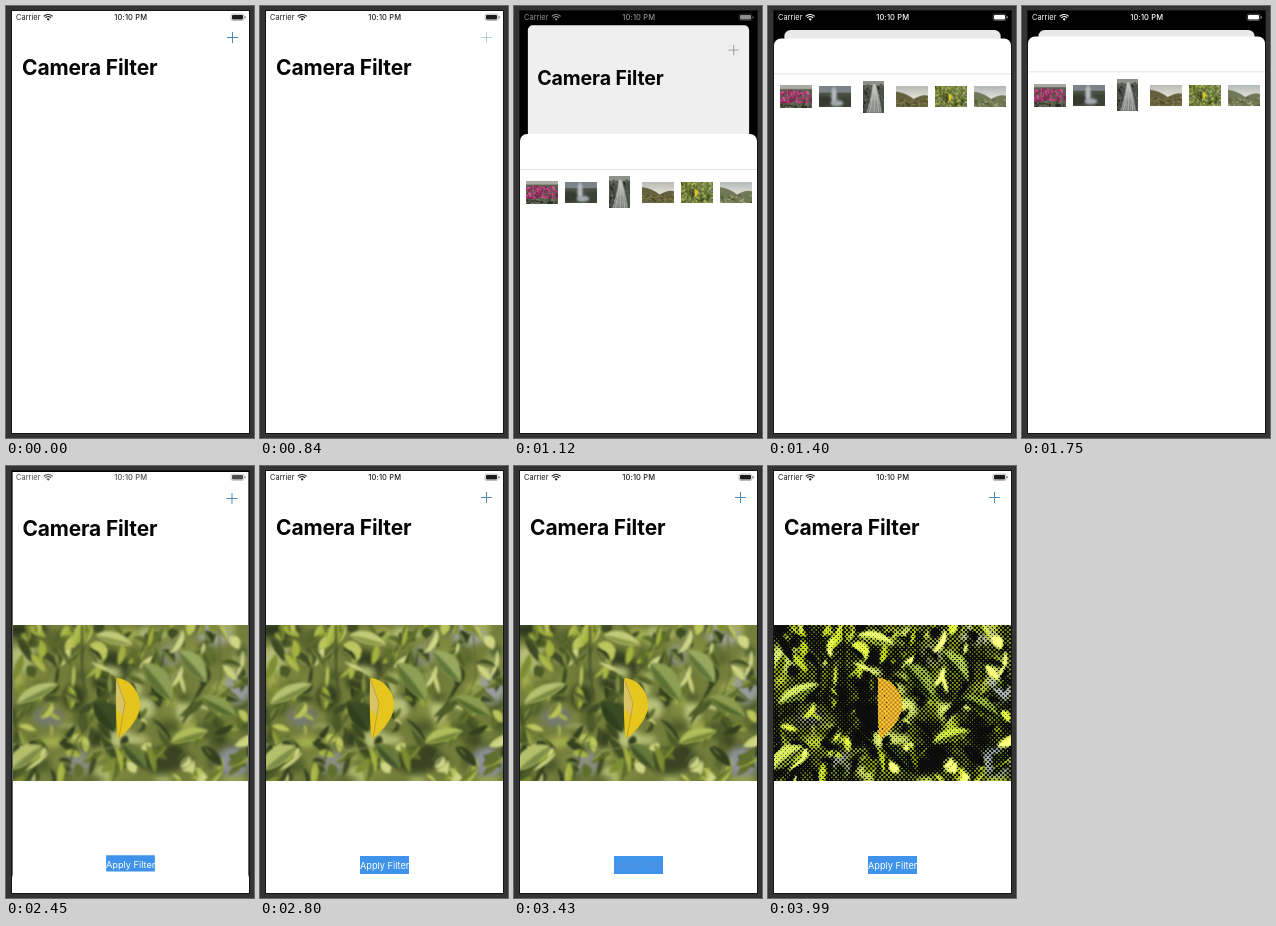
Animation of 248x432 px, one loop 4060 ms. Source, as an HTML page with a canvas:

```html
<!DOCTYPE html>
<html lang="en">
<head>
<meta charset="utf-8">
<title>Camera Filter</title>
<style>
html, body { margin: 0; width: 100%; height: 100%; overflow: hidden; background: #343434; }
canvas { display: block; width: 248px; height: 432px; }
</style>
</head>
<body>
<canvas id="stage"></canvas>
<script>
const LOOP = 4060, STEP = 70;
const W = 248, H = 432;
const SCREEN = { x: 6, y: 5, w: 237, h: 422 };
const PHOTO = { x: 6, y: 159, w: 237, h: 156 };
const SHEET = { open: 30.5, closed: 428, rise: 960, fall: 2180, rate: 17 };
const FONT = 'Inter, "Liberation Sans", sans-serif';

const stage = document.getElementById('stage');
const dpr = window.devicePixelRatio || 1;
stage.width = W * dpr;
stage.height = H * dpr;
const ctx = stage.getContext('2d');

const clamp = v => Math.max(0, Math.min(1, v));
const ramp = (t, from, to) => clamp((t - from) / (to - from));
const mix = (a, b, k) => `rgb(${a.map((v, i) => Math.round(v + (b[i] - v) * k))})`;

// Critically damped spring, 0 to 1
function spring(ms) {
  const x = SHEET.rate * Math.max(0, ms) / 1000;
  return 1 - (1 + x) * Math.exp(-x);
}

function seeded(seed) {
  return () => {
    seed = (seed * 1664525 + 1013904223) >>> 0;
    return seed / 4294967296;
  };
}

function makeCanvas(w, h, paint) {
  const c = document.createElement('canvas');
  c.width = w;
  c.height = h;
  paint(c.getContext('2d'), w, h);
  return c;
}

function box(g, color, x, y, w, h, r = 0) {
  g.fillStyle = color;
  g.beginPath();
  g.roundRect(x, y, w, h, r);
  g.fill();
}

function line(g, color, width, points) {
  g.strokeStyle = color;
  g.lineWidth = width;
  g.beginPath();
  points.forEach(([x, y], i) => i ? g.lineTo(x, y) : g.moveTo(x, y));
  g.stroke();
}

function blob(g, color, x, y, rx, ry) {
  g.fillStyle = color;
  g.beginPath();
  g.ellipse(x, y, rx, ry, 0, 0, Math.PI * 2);
  g.fill();
}

// A leaf with one bowed and one flatter side
function leaf(g, color, x, y, length, width, angle, shade) {
  const half = length / 2;
  g.save();
  g.translate(x, y);
  g.rotate(angle);
  g.fillStyle = color;
  g.beginPath();
  g.moveTo(-half, 0);
  g.bezierCurveTo(-half * 0.6, -width, half * 0.4, -width, half, 0);
  g.quadraticCurveTo(0, width * 0.7, -half, 0);
  g.fill();
  if (shade) {
    g.fillStyle = shade;
    g.beginPath();
    g.moveTo(-half, 0);
    g.quadraticCurveTo(0, -width * 0.2, half, 0);
    g.quadraticCurveTo(0, width * 0.7, -half, 0);
    g.fill();
  }
  g.restore();
}

function paintLeaves(g, w, h) {
  const rnd = seeded(41);
  const pick = list => list[Math.floor(rnd() * list.length)];
  box(g, '#747e3b', 0, 0, w, h);

  g.filter = 'blur(3px)';
  for (let i = 0; i < 150; i++) {
    blob(g, pick(['#a5b04f', '#b9c279', '#4d5b2a', '#343f1f', '#7f893f', '#59652e']),
      rnd() * w, rnd() * h, 3 + rnd() * 10, 3 + rnd() * 8);
  }
  blob(g, '#989ca2', 226, 62, 12, 17);
  blob(g, '#8f929a', 222, 137, 17, 15);
  blob(g, '#a0a396', 203, 10, 18, 10);
  blob(g, '#8a8f82', 66, 137, 14, 13);
  blob(g, '#979a8e', 158, 30, 10, 10);
  blob(g, '#767b70', 36, 92, 15, 10);
  blob(g, '#30391d', 12, 5, 24, 8);
  blob(g, '#353f20', 62, 72, 12, 13);
  blob(g, '#3a4423', 150, 136, 22, 12);
  g.filter = 'blur(0.9px)';

  for (let i = 0; i < 210; i++) {
    const x = rnd() * w, y = rnd() * h, size = 10 + rnd() * 21;
    leaf(g, pick(['#7d8d32', '#a4b23f', '#4c5b27', '#323f1e', '#bcc65c', '#5f6f2c', '#d0d686', '#3f4c24']),
      x, y, size, 3 + rnd() * 7, 0.2 + rnd() * 2.5, pick(['#c6ce7077', '#34411f88', '']));
  }

  line(g, '#46502b', 2, [[70, 0], [70, 48], [73, 70]]);
  line(g, '#4b552a', 1.6, [[140, 0], [125, 38], [91, 77], [64, 116], [53, 153]]);
  line(g, '#5e6938', 1.3, [[207, 0], [210, 50], [196, 92], [166, 136]]);
  line(g, '#8a9451', 1.2, [[0, 120], [43, 108], [82, 126], [116, 120]]);

  leaf(g, '#c2cb79', 102, 15, 38, 11, 0.25, '#8c994a');
  leaf(g, '#8d9f55', 145, 57, 48, 18, 0.9, '#5c7233');
  leaf(g, '#98a95f', 181, 42, 42, 16, 0.85, '#61763a');
  leaf(g, '#8b9c50', 207, 82, 42, 13, 0.5, '#536a2d');
  leaf(g, '#b5c071', 25, 69, 46, 12, -0.45, '#7a8b41');
  leaf(g, '#b4bf6b', 14, 133, 40, 16, -0.65, '#7d8c47');
  leaf(g, '#3a4c23', 92, 92, 36, 19, 0.95, '#2f3f1d');
  leaf(g, '#65783a', 122, 132, 36, 13, 0.8, '#42532a');
  leaf(g, '#b0bd5a', 178, 112, 40, 12, -0.3, '#758539');

  g.filter = 'blur(0.4px)';
  g.fillStyle = '#e6c51c';
  g.beginPath();
  g.moveTo(104, 53);
  g.bezierCurveTo(120, 54, 130, 70, 128, 84);
  g.bezierCurveTo(125, 97, 114, 108, 106, 114);
  g.bezierCurveTo(103, 96, 104, 72, 104, 53);
  g.fill();
  g.fillStyle = '#d9c465';
  g.beginPath();
  g.moveTo(104, 54);
  g.quadraticCurveTo(116, 72, 112, 92);
  g.lineTo(104, 84);
  g.fill();
  line(g, '#b89b24', 0.8, [[104, 53], [113, 78], [107, 113]]);
  g.filter = 'none';
}

// Contrasty colours under a diagonal screen of black dots
function paintComic(g, w, h) {
  g.drawImage(leaves, 0, 0);
  const img = g.getImageData(0, 0, w, h), d = img.data;
  for (let y = 0; y < h; y++) {
    for (let x = 0; x < w; x++) {
      const i = (y * w + x) * 4;
      const light = (0.3 * d[i] + 0.59 * d[i + 1] + 0.11 * d[i + 2]) / 255;
      const screen = Math.cos(x * Math.PI / 2.2) * Math.cos(y * Math.PI / 2.2);
      const ink = clamp((0.5 + 0.24 * screen - light) * 7 + 0.5);
      const golden = d[i] > 200 && d[i + 2] < 110 && d[i] > d[i + 1] + 12;
      for (let c = 0; c < 3; c++) {
        const vivid = light * 255 + (d[i + c] - light * 255) * 1.25;
        const bright = Math.min(255, (vivid - 128) * 1.35 + 148);
        d[i + c] = golden
          ? [222, 168, 45][c] - screen * [35, 55, 15][c]
          : Math.max(0, bright) * (1 - ink) + 12 * ink;
      }
    }
  }
  g.putImageData(img, 0, 0);
}

function landscape(sky, hill, ground, seed) {
  return (g, w, h) => {
    const rnd = seeded(seed);
    const air = g.createLinearGradient(0, 0, 0, h);
    air.addColorStop(0, sky);
    air.addColorStop(0.5, '#dcdcd2');
    g.fillStyle = air;
    g.fillRect(0, 0, w, h);
    g.fillStyle = hill;
    g.beginPath();
    g.moveTo(0, h * 0.25);
    g.quadraticCurveTo(w * 0.3, h * 0.3, w * 0.55, h * 0.6);
    g.quadraticCurveTo(w * 0.85, h * 0.35, w, h * 0.45);
    g.lineTo(w, h);
    g.lineTo(0, h);
    g.fill();
    for (let i = 0; i < 60; i++) {
      blob(g, ground[i % ground.length], rnd() * w, h * (0.6 + rnd() * 0.4), 2 + rnd() * 5, 1 + rnd() * 3);
    }
  };
}

function paintFlowers(g, w, h) {
  const rnd = seeded(9);
  box(g, '#59614b', 0, 0, w, h);
  box(g, '#a9aba5', 0, 0, w, h * 0.16);
  for (let i = 0; i < 150; i++) {
    blob(g, ['#b92d77', '#cf3f8c', '#8e2359', '#d75b9f', '#6e2447'][i % 5],
      rnd() * w, h * (0.24 + rnd() * 0.53), 2 + rnd() * 4, 2 + rnd() * 3);
  }
  for (let i = 0; i < 40; i++) {
    blob(g, ['#33382c', '#24271f', '#747a62'][i % 3], rnd() * w, h * (0.8 + rnd() * 0.2), 4, 3);
  }
}

function paintSpray(g, w, h) {
  box(g, '#7c8387', 0, 0, w, h);
  box(g, '#4c5146', 0, h * 0.3, w, h * 0.7);
  g.filter = 'blur(4px)';
  blob(g, '#343a2e', w * 0.15, h * 0.72, w * 0.3, h * 0.25);
  blob(g, '#3d4237', w * 0.85, h * 0.75, w * 0.25, h * 0.3);
  blob(g, '#b9bec3', w * 0.47, h * 0.45, w * 0.08, h * 0.42);
  blob(g, '#a4a9b2', w * 0.56, h * 0.8, w * 0.2, h * 0.14);
  g.filter = 'none';
}

function paintWaterfall(g, w, h) {
  const rnd = seeded(17);
  box(g, '#4b5048', 0, 0, w, h);
  box(g, '#8d918a', 0, 0, w, h * 0.14);
  for (let i = 0; i < 50; i++) {
    blob(g, ['#292d28', '#5f6558', '#3b4038'][i % 3], rnd() * w, h * (0.1 + rnd() * 0.9), 5, 6);
  }
  g.filter = 'blur(2px)';
  for (let i = 0; i < 7; i++) {
    line(g, i % 2 ? '#d6d9d8' : '#b5bab8', 5, [
      [w * 0.5 + i, h * 0.12], [w * (0.42 + i * 0.05), h * 0.45], [w * (0.2 + i * 0.11), h]
    ]);
  }
  g.filter = 'none';
}

const leaves = makeCanvas(PHOTO.w, PHOTO.h, paintLeaves);
const comic = makeCanvas(PHOTO.w, PHOTO.h, paintComic);
const thumbs = [
  [28, 32, 23, makeCanvas(128, 92, paintFlowers)],
  [67, 32, 21, makeCanvas(128, 84, paintSpray)],
  [105.5, 21, 32, makeCanvas(84, 128, paintWaterfall)],
  [144, 32, 21, makeCanvas(128, 84, landscape('#b9bab4', '#65613f', ['#454528', '#7c773e', '#938951'], 5))],
  [182.5, 32, 21, leaves],
  [221.5, 32, 21, makeCanvas(128, 84, landscape('#b3b9bd', '#707857', ['#788044', '#4e5937', '#b0b08a'], 23))]
];

function text(str, x, y, size, weight, color, align = 'left', spacing = 0) {
  ctx.font = `${weight} ${size}px ${FONT}`;
  ctx.textAlign = align;
  ctx.textBaseline = 'alphabetic';
  ctx.letterSpacing = spacing + 'px';
  ctx.fillStyle = color;
  ctx.fillText(str, x, y);
}

function drawStatus(white) {
  const color = mix([28, 28, 28], [255, 255, 255], white);
  text('Carrier', 10, 14.4, 7.4, 400, color, 'left', 0.05);
  text('10:10 PM', 124.7, 14.4, 7.5, 550, color, 'center', 0.12);
  ctx.strokeStyle = ctx.fillStyle = color;
  ctx.lineWidth = 1.2;
  for (const r of [6.1, 3.9]) {
    ctx.beginPath();
    ctx.arc(42.2, 14.6, r, -Math.PI * 0.76, -Math.PI * 0.24);
    ctx.stroke();
  }
  ctx.beginPath();
  ctx.moveTo(42.2, 14.8);
  ctx.arc(42.2, 14.6, 2.2, -Math.PI * 0.76, -Math.PI * 0.24);
  ctx.fill();
  ctx.lineWidth = 0.6;
  ctx.globalAlpha = 0.5;
  ctx.beginPath();
  ctx.roundRect(225, 8.1, 13, 6.4, 1.8);
  ctx.stroke();
  ctx.globalAlpha = 1;
  box(ctx, color, 226, 9, 11, 4.6, 1);
  box(ctx, color, 238.7, 10.3, 0.8, 2, 0.4);
}

function drawHome(t, open) {
  const scale = 1 - 0.088 * open;
  ctx.save();
  ctx.translate(SCREEN.x + SCREEN.w / 2, SCREEN.y + 19 * open);
  ctx.scale(scale, scale);
  ctx.translate(-SCREEN.x - SCREEN.w / 2, -SCREEN.y);
  box(ctx, '#fff', SCREEN.x, SCREEN.y, SCREEN.w, SCREEN.h, 7 * open);

  ctx.globalAlpha = t >= 840 && t < 980 ? 0.4 : 1;
  const tint = mix([76, 138, 186], [165, 165, 165], clamp(open * 1.25));
  line(ctx, tint, 1, [[221, 31.5], [232, 31.5]]);
  line(ctx, tint, 1, [[226.5, 26], [226.5, 37]]);
  ctx.globalAlpha = 1;
  text('Camera Filter', 16, 68.9, 21, 650, '#050505', 'left', -0.15);

  if (t >= 2100) {
    ctx.drawImage(t >= 3500 ? comic : leaves, PHOTO.x, PHOTO.y, PHOTO.w, PHOTO.h);
    const faded = ramp(t, 3080, 3290) - ramp(t, 3500, 3990);
    box(ctx, '#3f93ea', 100, 390, 49, 18);
    text('Apply Filter', 124.6, 402.7, 9.2, 400, mix([255, 255, 255], [84, 143, 214], faded), 'center');
  }
  box(ctx, `rgba(0,0,0,${0.085 * open})`, SCREEN.x, SCREEN.y, SCREEN.w, SCREEN.h, 7 * open);
  ctx.restore();
}

function drawSheet(top) {
  box(ctx, '#fff', SCREEN.x, top, SCREEN.w, H, [7, 7, 0, 0]);
  box(ctx, '#d9d9d9', SCREEN.x, top + 35, SCREEN.w, 0.8);
  for (const [x, w, h, picture] of thumbs) {
    ctx.drawImage(picture, x - w / 2, top + 58.5 - h / 2, w, h);
  }
}

function draw(t) {
  const open = spring(t - SHEET.rise) - spring(t - SHEET.fall);
  ctx.setTransform(dpr, 0, 0, dpr, 0, 0);
  ctx.imageSmoothingQuality = 'high';
  box(ctx, '#343434', 0, 0, W, H);
  box(ctx, '#141414', 5, 4, 239, 424);

  ctx.save();
  ctx.beginPath();
  ctx.rect(SCREEN.x, SCREEN.y, SCREEN.w, SCREEN.h);
  ctx.clip();
  box(ctx, '#000', SCREEN.x, SCREEN.y, SCREEN.w, SCREEN.h);
  drawHome(t, open);
  if (open > 0.002) drawSheet(SHEET.closed + (SHEET.open - SHEET.closed) * open);
  drawStatus(ramp(t, 960, 1280) - ramp(t, 2270, 2500));
  ctx.restore();
}

const start = performance.now();
function tick() {
  const t = (performance.now() - start) % LOOP;
  draw(Math.floor(t / STEP) * STEP);
  requestAnimationFrame(tick);
}
tick();
</script>
</body>
</html>
```
